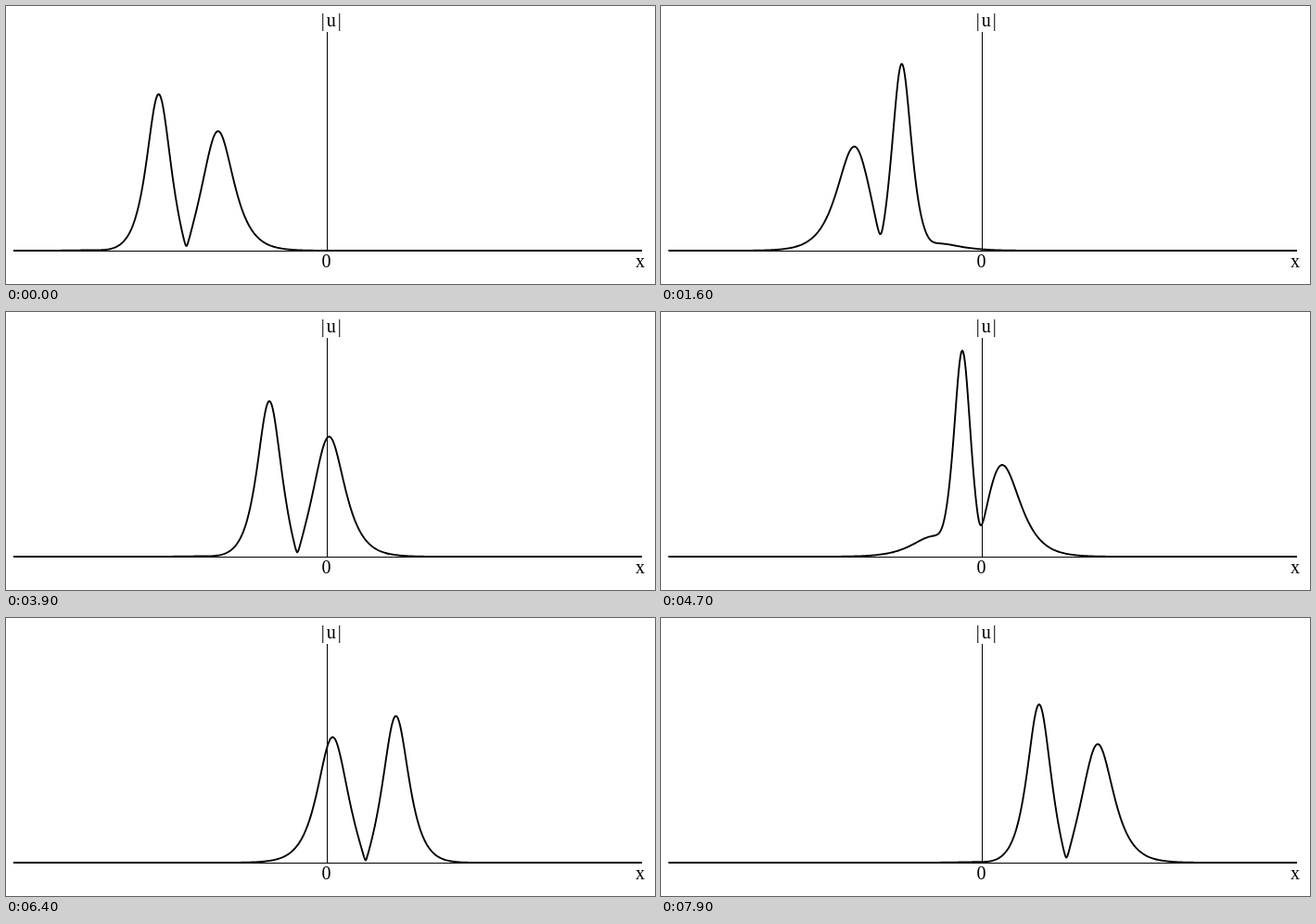
An HTML page with a canvas for the animation above (8 s loop, 700x300 px).

```html
<!DOCTYPE html>
<html lang="en">
<head>
<meta charset="utf-8">
<title>Breather</title>
<style>
html, body { margin: 0; width: 700px; height: 300px; overflow: hidden; background: #fff; }
canvas { display: block; }
</style>
</head>
<body>
<canvas id="stage" width="700" height="300"></canvas>
<script>
const ctx = document.getElementById('stage').getContext('2d');

const ORIGIN = 346, BASE = 264, LEFT = 8, RIGHT = 686;
const STEP = 100, STEPS = 80, MIDDLE = 50;

// Two bound solitons of equal width: decay, wave number, offset, scale
const ETA = 0.069, K = 0.0116, S = 0.1, C = Math.hypot(1, S), SCALE = 2000;
const SPEED = 3.07, OMEGA = 0.08;

// |u| at distance y from the moving centre
function height(y, t) {
  const psi = K * y - OMEGA * t;
  const c = Math.cos(psi), s = Math.sin(psi);
  const ch = Math.cosh(ETA * y), sh = Math.sinh(ETA * y);
  const re = C * (K * ch * c - ETA * sh * s);
  const im = S * (K * sh * s + ETA * ch * c);
  const den = (K * ch) ** 2 + (ETA * s) ** 2 + S * S * (ETA * ETA + K * K);
  return SCALE * 2 * K * ETA * Math.hypot(re, im) / den;
}

function drawAxes() {
  ctx.fillStyle = '#000';
  ctx.fillRect(LEFT, BASE, RIGHT - LEFT, 1);
  ctx.fillRect(ORIGIN, 28, 1, BASE - 28);
  ctx.font = '20px "Liberation Serif", "Times New Roman", serif';
  ctx.letterSpacing = '2px';
  ctx.fillText('|u|', 339.7, 22);
  ctx.letterSpacing = '0px';
  ctx.fillText('0', 340.5, 282);
  ctx.fillText('x', 679, 282);
}

function drawCurve(t) {
  const centre = ORIGIN + SPEED * t;
  ctx.beginPath();
  for (let x = LEFT; x <= RIGHT; x++) ctx.lineTo(x, BASE - height(x - centre, t));
  ctx.lineWidth = 1.9;
  ctx.lineJoin = 'round';
  ctx.stroke();
}

function draw(now) {
  const step = Math.floor(now / STEP) % STEPS;
  ctx.fillStyle = '#fff';
  ctx.fillRect(0, 0, 700, 300);
  drawAxes();
  drawCurve(step - MIDDLE);
}

const start = performance.now();
function tick() {
  draw(performance.now() - start);
  requestAnimationFrame(tick);
}
tick();
</script>
</body>
</html>
```
